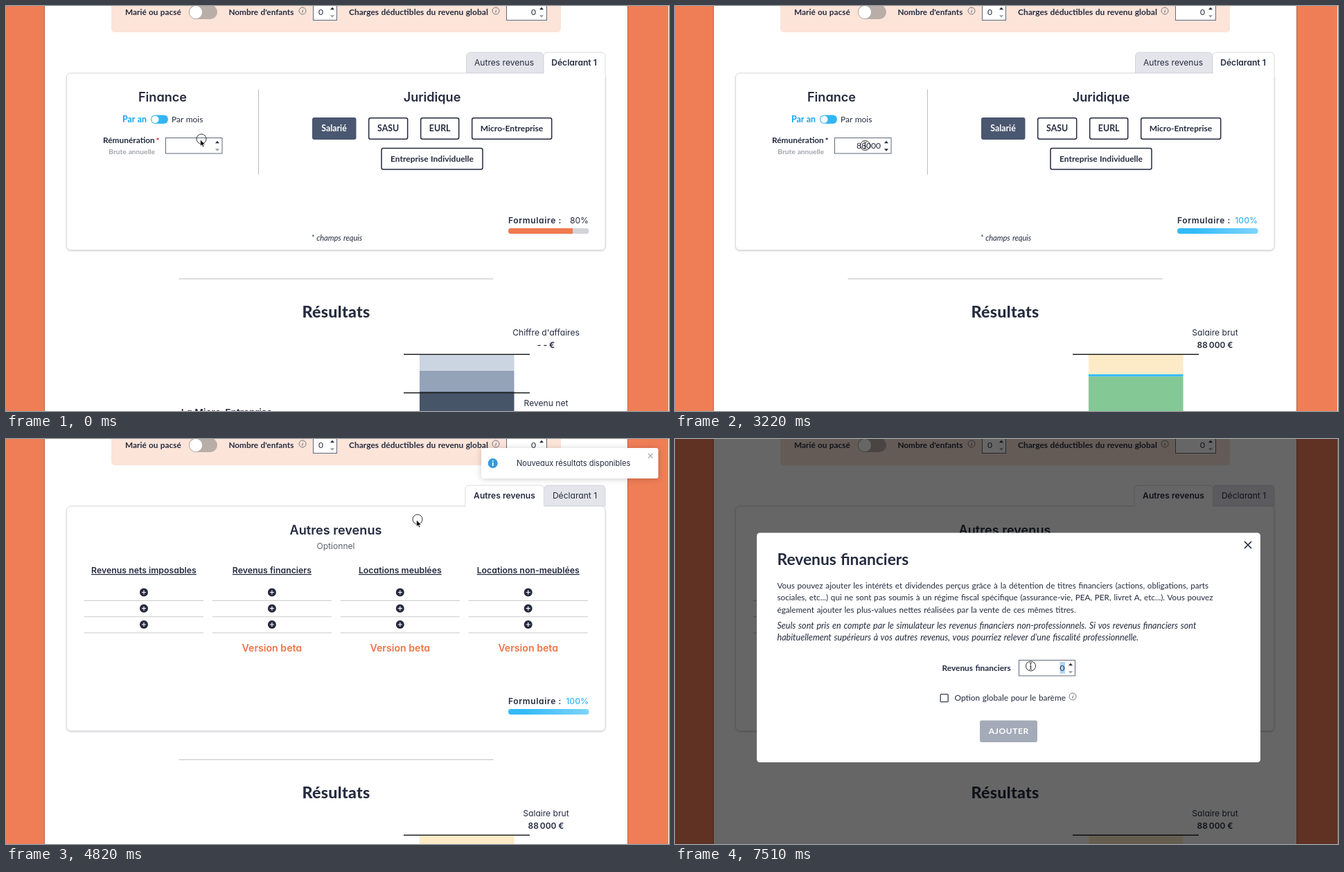
An HTML page that plays this animation: 957x585 px, repeating every 8 s.

```html
<!DOCTYPE html>
<html lang="fr">
<head>
<meta charset="utf-8">
<title>Simulateur de revenus</title>
<style>
  html, body { margin: 0; width: 100%; height: 100%; overflow: hidden; background: #fff; }
  svg { display: block; }
  text { fill: #252b3f; white-space: pre; }
  .n { font: 400 12px Lato, "Open Sans", sans-serif; word-spacing: .5px; }
  .p { font: 400 12.1px Inter, "Open Sans", sans-serif; font-feature-settings: "cv11"; }
  .b { font-weight: 700; }
  .s { font-weight: 600; }
  .mid { text-anchor: middle; }
  .end { text-anchor: end; }
  .h2 { font-size: 18.1px; }
  .title { font-size: 23.2px; font-weight: 800; letter-spacing: .3px; }
  .body { font-size: 11.7px; word-spacing: .8px; }
  .it { font-size: 12.57px; font-style: italic; }
  .blue { fill: #33b5f4; }
  .head { font-size: 12.3px; }
  .beta { font-size: 14.15px; fill: #f0754a; }
  .card { fill: #fff; stroke: #d9dbe0; filter: drop-shadow(0 1.5px 1px rgba(0,0,0,.18)); }
  .tab { fill: #fff; stroke: #d9dbe0; }
  .off { fill: #e4e5eb; stroke: #d2d4db; }
  .field { fill: #fff; stroke: #60687a; }
  .btn { fill: #fff; stroke: #252b3f; stroke-width: 1.5; }
  .ink { fill: #252b3f; }
  .dim { fill: #9a9ca4; }
  .line { stroke: #222; stroke-width: 1.4; }
  .rule { stroke: #c9cacf; }
</style>
</head>
<body>
<svg width="957" height="585" viewBox="0 0 957 585">
  <defs>
    <path id="up" d="M-3 1.8L0-1.8L3 1.8Z"/>
    <path id="down" d="M-3-1.8L0 1.8L3-1.8Z"/>
    <g id="info" fill="none" stroke="#565b69" stroke-width=".8">
      <circle r="5"/><path d="M.5-.8L-.4 2.6M.8-2.7L.7-2.2" stroke-width="1"/>
    </g>
    <g id="plus">
      <circle r="6" class="ink"/><path d="M-3 0H3M0-3V3" stroke="#fff" stroke-width="1.2"/>
    </g>
    <linearGradient id="sky"><stop offset=".2" stop-color="#33bbf8"/><stop offset="1" stop-color="#7fd4fd"/></linearGradient>
    <clipPath id="bar"><rect x="725" y="321" width="116.500" height="8" rx="4"/></clipPath>
  </defs>

  <!-- page frame -->
  <rect width="956" height="585" fill="#ef7e57"/>
  <rect x="55" width="843" height="585" fill="#b9603f"/>
  <rect x="56" width="841" height="585" fill="#fff"/>

  <!-- household strip -->
  <rect x="152" y="-20" width="649" height="58" rx="5" fill="#fce4d9"/>
  <g>
    <text class="n b" x="172" y="13" style="font-size:11.800px">Marié ou pacsé</text>
    <text class="n b" x="321.500" y="13" style="font-size:11.750px">Nombre d'enfants</text>
    <text class="n b" x="495" y="13">Charges déductibles du revenu global</text>
  </g>
  <rect x="264" y="-1.500" width="41" height="20.500" rx="10.200" fill="#b9aea7"/>
  <circle cx="274" cy="9" r="9.600" fill="#fff" stroke="#aaa09a" stroke-width=".8"/>
  <use href="#info" x="428" y="7"/>
  <use href="#info" x="707" y="7"/>
  <rect class="field" x="443.500" y="-5" width="34" height="25.500"/>
  <rect class="field" x="722.500" y="-5" width="58" height="25.500"/>
  <text class="n mid" x="454.500" y="13">0</text>
  <text class="n mid" x="761.500" y="13">0</text>
  <use href="#up" x="471" y="3.500" class="ink"/><use href="#down" x="471" y="15" class="dim"/>
  <use href="#up" x="773" y="3.500" class="ink"/><use href="#down" x="773" y="15" class="dim"/>

  <!-- first tab -->
  <g data-on="0-4820">
    <path class="tab off" d="M664.500 97V73q0-6 6-6H769.500q6 0 6 6V97Z"/>
    <rect class="card" x="87.500" y="97" width="777.500" height="255.500" rx="6"/>
    <path class="tab" d="M776 98V73q0-6 6-6H859q6 0 6 6V104"/>
    <path d="M776.500 97.500H864.500V104H776.500Z" fill="#fff"/>
    <text class="p mid" x="719" y="86">Autres revenus</text>
    <text class="p s mid" x="820" y="86">Déclarant 1</text>

    <text class="p s h2 mid" x="226" y="138">Finance</text>
    <text class="p s h2 mid" x="615" y="138">Juridique</text>
    <path d="M364.500 120.500V243.500" stroke="#b8bbc4"/>
    <text class="n b blue" x="168" y="168" style="fill:#14a5e8;font-size:12.400px">Par an</text>
    <rect x="209" y="157.500" width="25" height="12.500" rx="6.200" fill="#33b5f4"/>
    <circle cx="215.300" cy="163.800" r="5.200" fill="#fff"/>
    <text class="n" x="239" y="168">Par mois</text>
    <text class="n b" x="140" y="198" style="font-size:11.900px">Rémunération</text>
    <text class="n b" x="216.500" y="199" id="star">*</text>
    <text class="n b end" x="215" y="214" style="font-size:10.200px;fill:#a0a4ae">Brute annuelle</text>
    <rect class="field" x="230.500" y="190.500" width="81.500" height="22.500"/>
    <use href="#up" x="305" y="196.500" class="ink"/>
    <use href="#down" x="305" y="208" class="dim" data-on="0-1870"/>
    <use href="#down" x="305" y="208" class="ink" data-on="1870-4820"/>
    <text class="n end" x="297" y="206" style="font-size:12.100px" id="pay"></text>
    <path d="M296.500 194V210" stroke="#111" data-on="1070-1340 1870-3220 3490-3760 4020-4290"/>

    <rect x="442" y="161" width="63.500" height="32" rx="3" fill="#4a5770"/>
    <rect class="btn" x="523.700" y="161.700" width="56" height="30.500" rx="2.500"/>
    <rect class="btn" x="598.700" y="161.700" width="55" height="30.500" rx="2.500"/>
    <rect class="btn" x="672.700" y="161.700" width="115" height="30.500" rx="2.500"/>
    <rect class="btn" x="542" y="205.500" width="146" height="30.500" rx="2.500"/>
    <g class="n b mid">
      <text x="473.500" y="181" style="fill:#fff;font-size:12.300px">Salarié</text>
      <text x="551.700" y="181" style="font-size:12.400px">SASU</text>
      <text x="626.200" y="181" style="font-size:12.400px">EURL</text>
      <text x="730" y="181">Micro-Entreprise</text>
      <text x="615" y="224.500">Entreprise Individuelle</text>
    </g>
    <text class="n it mid" x="477.500" y="339" style="font-size:11.100px">* champs requis</text>
  </g>

  <!-- second tab -->
  <g data-on="4820-8000">
    <path class="tab off" d="M776.500 97V73q0-6 6-6H859q6 0 6 6V97Z"/>
    <rect class="card" x="87.500" y="97" width="777.500" height="324.500" rx="6"/>
    <path class="tab" d="M663 97V73q0-6 6-6H770.500q6 0 6 6V97"/>
    <path d="M663.500 96.400H776V98.500H663.500Z" fill="#fff"/>
    <text class="p s mid" x="719.500" y="86">Autres revenus</text>
    <text class="p mid" x="821" y="86">Déclarant 1</text>
    <text class="p s h2 mid" x="476" y="138">Autres revenus</text>
    <text class="p mid" x="476" y="159" style="fill:#5d6371">Optionnel</text>
    <g id="cols"></g>
  </g>

  <!-- progress and results -->
  <g id="lower">
    <g data-on="0-1870 3220-8000">
      <text class="p s" x="725" y="314" style="font-size:12px;letter-spacing:.65px">Formulaire :</text>
    </g>
    <rect x="725" y="321" width="116.500" height="8" rx="4" fill="#d3d4da"/>
    <g data-on="0-1870">
      <text class="p end" x="841" y="314">80%</text>
      <rect x="725" y="321" width="93" height="8" clip-path="url(#bar)" fill="#f07a4f"/>
    </g>
    <g data-on="1870-3220">
      <text class="p mid" x="783.300" y="312.500" style="font-size:11.600px;font-weight:500;letter-spacing:.85px;fill:#9a9ca4">Chargement</text>
      <g clip-path="url(#bar)"><rect id="load" y="321" width="37" height="8" fill="#7fd4fd"/></g>
    </g>
    <g data-on="3220-8000">
      <text class="p end blue" x="841" y="314" style="font-weight:500">100%</text>
      <rect x="725" y="321" width="116.500" height="8" rx="4" fill="url(#sky)"/>
    </g>
    <path class="rule" d="M249.500 394.200H703.500" stroke-width="1.300"/>
    <text class="n title mid" x="476.500" y="450">Résultats</text>

    <g data-on="0-3220">
      <text class="p mid" x="779.500" y="476">Chiffre d'affaires</text>
      <text class="p s mid" x="779.500" y="494">- - €</text>
      <path d="M597 504h136.500v23H597Z" fill="#cbd5e1"/>
      <path d="M597 527h136.500v31H597Z" fill="#94a3b8"/>
      <path d="M597 557h136.500v100H597Z" fill="#475569"/>
      <path class="line" d="M574 558.700H756"/>
      <text class="p mid" x="779.500" y="577.500">Revenu net</text>
      <text class="p s mid" x="318.500" y="591.500" style="font-size:13.700px">La Micro-Entreprise</text>
    </g>
    <g data-on="3220-8000">
      <text class="p mid" x="779.500" y="476">Salaire brut</text>
      <text class="p s mid" x="779.500" y="494" style="font-size:11.900px">88&#8201;000 €</text>
      <path d="M597 504h136.500v100H597Z" fill="#fdebc8"/>
      <g data-on="3220-3490">
        <path d="M597 532h136.500v3.500H597Z" fill="#38bdf8"/>
        <path d="M597 535.500h136.500v70H597Z" fill="#84c896"/>
      </g>
      <path d="M597 552h136.500v70H597Z" fill="#38bdf8" data-on="3490-8000"/>
    </g>
    <path class="line" d="M574 503.300H756"/>
  </g>

  <!-- dialog -->
  <g data-on="6170-8000">
    <rect width="957" height="585" fill="#000" fill-opacity=".6"/>
    <rect x="118" y="135.500" width="727" height="331.500" rx="4.400" fill="#fff"/>
    <path d="M822 148L832 158M832 148L822 158" stroke="#252b3f" stroke-width="1.700"/>
    <text class="n b" x="147.500" y="182" style="font-size:22.800px">Revenus financiers</text>
    <g class="n body">
      <text x="147.500" y="215.500">Vous pouvez ajouter les intérêts et dividendes perçus grâce à la détention de titres financiers (actions, obligations, parts</text>
      <text x="147.500" y="233">sociales, etc...) qui ne sont pas soumis à un régime fiscal spécifique (assurance-vie, PEA, PER, livret A, etc...). Vous pouvez</text>
      <text x="147.500" y="250.500">également ajouter les plus-values nettes réalisées par la vente de ces mêmes titres.</text>
    </g>
    <g class="n body it">
      <text x="147.500" y="273.500">Seuls sont pris en compte par le simulateur les revenus financiers non-professionnels. Si vos revenus financiers sont</text>
      <text x="147.500" y="291">habituellement supérieurs à vos autres revenus, vous pourriez relever d’une fiscalité professionnelle.</text>
    </g>
    <text class="n b" x="385.500" y="334.500" style="font-size:11.900px">Revenus financiers</text>
    <rect class="field" x="496.500" y="319.500" width="81" height="22.500"/>
    <rect x="555.500" y="322" width="7.500" height="17" fill="#b3d7fe" data-on="7510-8000"/>
    <text class="n end" x="562.500" y="335">0</text>
    <use href="#up" x="571" y="325.500" class="ink"/><use href="#down" x="571" y="337" class="dim"/>
    <rect x="383.200" y="368.700" width="11" height="11" rx="1" fill="#fff" stroke="#3a4052" stroke-width="1.300"/>
    <text class="n" x="403.500" y="378" style="font-size:11.900px">Option globale pour le barème</text>
    <use href="#info" x="574" y="372"/>
    <rect x="440" y="406.500" width="83" height="31.500" rx="3" fill="#a4abb8"/>
    <text class="n b mid" x="481.800" y="426.300" style="fill:#fff;letter-spacing:.6px">AJOUTER</text>
  </g>

  <!-- notification -->
  <g data-on="3490-6440" id="toast">
    <rect x="686" y="13" width="255.500" height="44" rx="3" fill="#fff" style="filter:drop-shadow(0 1px 4px rgba(0,0,0,.2))"/>
    <circle cx="702.700" cy="35" r="7" fill="#3498db"/>
    <path d="M702.700 34V39M702.700 31V32.800" stroke="#fff" stroke-width="1.800"/>
    <text class="p" x="737" y="39" style="font-size:11.050px">Nouveaux résultats disponibles</text>
    <path d="M927 21L933.500 27.500M933.500 21L927 27.500" stroke="#aaa" stroke-width="1.200"/>
  </g>

  <g id="cursor">
    <circle r="7" fill="none" stroke="#1b1b1b" stroke-width=".9"/>
    <path data-shape="arrow" d="M-1.500 1V10.500L.8 8.500L2.400 12L4 11.300L2.500 7.900H5.400Z" fill="#000" stroke="#fff" stroke-width=".7"/>
    <path data-shape="beam" d="M-2-5Q0-5 0-3.700Q0-5 2-5M0-4V4M-2 5Q0 5 0 3.700Q0 5 2 5M-1.200 1H1.200" fill="none" stroke="#111" stroke-width=".8"/>
    <path data-shape="hand" d="M-1.700 8V1.300Q-.8-.2.1 1.300V4.800Q1.500 4 2 5.100Q3.200 4.500 3.700 5.600Q5.200 5.200 5.300 6.800Q5.400 9.500 4.200 11.800H-.8Q-2 9.800-4 7.600Q-3.600 5.800-1.700 8Z" fill="#fff" stroke="#111" stroke-width="1"/>
  </g>
</svg>
<script>
  const LOOP = 8000;
  const $ = id => document.getElementById(id);

  // columns of the second tab, 185 px apart
  const heads = ["Revenus nets imposables", "Revenus financiers", "Locations meublées", "Locations non-meublées"];
  $("cols").innerHTML = heads.map((head, i) => {
    const x = 199 + i * 184.9;
    const rows = [221.5, 244.7, 268].map(y =>
      `<use href="#plus" x="${x}" y="${y}"/><path class="rule" d="M${x - 86} ${y + 12}h172"/>`).join("");
    const beta = i ? `<text class="p s beta mid" x="${x}" y="307">Version beta</text>` : "";
    return `<text class="p s head mid" x="${x}" y="194" text-decoration="underline">${head}</text>${rows}${beta}`;
  }).join("");

  // each list holds [start, ...values], kept until the next start
  const cursorPath = [
    [0, 282, 192, "arrow"], [260, 274, 204, "beam"], [530, 274, 200, "beam"], [800, 274.5, 201.5, "beam"],
    [3490, 312, 196, "arrow"], [3760, 480, 150, "arrow"], [4020, 640, 108, "arrow"], [4290, 699, 91.5, "hand"],
    [4820, 594, 116, "arrow"], [5090, 445, 177, "arrow"], [5360, 397, 210, "arrow"], [5630, 390, 216, "hand"],
    [5900, 387, 218, "hand"], [6170, 387, 218, "beam"], [6440, 484, 273, "beam"], [6710, 506, 306, "arrow"],
    [6970, 512.5, 322, "beam"], [7240, 513.5, 328, "beam"]
  ];
  const typing = [[0, ""], [1870, "8"], [2140, "88"], [2410, "880"], [2680, "8800"], [2950, "88000"]];
  const loading = [[0, 718], [2140, 755], [2410, 810], [2680, 718], [2950, 758]];
  const sliding = [[0, 150, 1], [3760, -12, 1], [4020, 0, 1], [6170, 143.5, .88]];
  const at = (list, t) => list.filter(step => step[0] <= t).pop().slice(1);

  const timed = [...document.querySelectorAll("[data-on]")].map(el =>
    ({ el, spans: el.dataset.on.split(" ").map(s => s.split("-").map(Number)) }));
  const shapes = document.querySelectorAll("[data-shape]");

  function draw(t) {
    for (const { el, spans } of timed)
      el.style.display = spans.some(([a, b]) => t >= a && t < b) ? "" : "none";

    const [x, y, shape] = at(cursorPath, t);
    $("cursor").setAttribute("transform", `translate(${x} ${y})`);
    shapes.forEach(el => el.style.display = el.dataset.shape === shape ? "" : "none");

    $("pay").textContent = at(typing, t)[0];
    $("star").style.fill = t < 1870 ? "#e02424" : "#252b3f";
    $("load").setAttribute("x", at(loading, t)[0]);
    $("lower").setAttribute("transform", `translate(0 ${t < 4820 ? 0 : 69})`);

    const [shift, alpha] = at(sliding, t);
    $("toast").setAttribute("transform", `translate(${shift} 0)`);
    $("toast").style.opacity = alpha;
  }

  const start = performance.now();
  function tick() {
    draw((performance.now() - start) % LOOP);
    requestAnimationFrame(tick);
  }
  tick();
</script>
</body>
</html>
```
